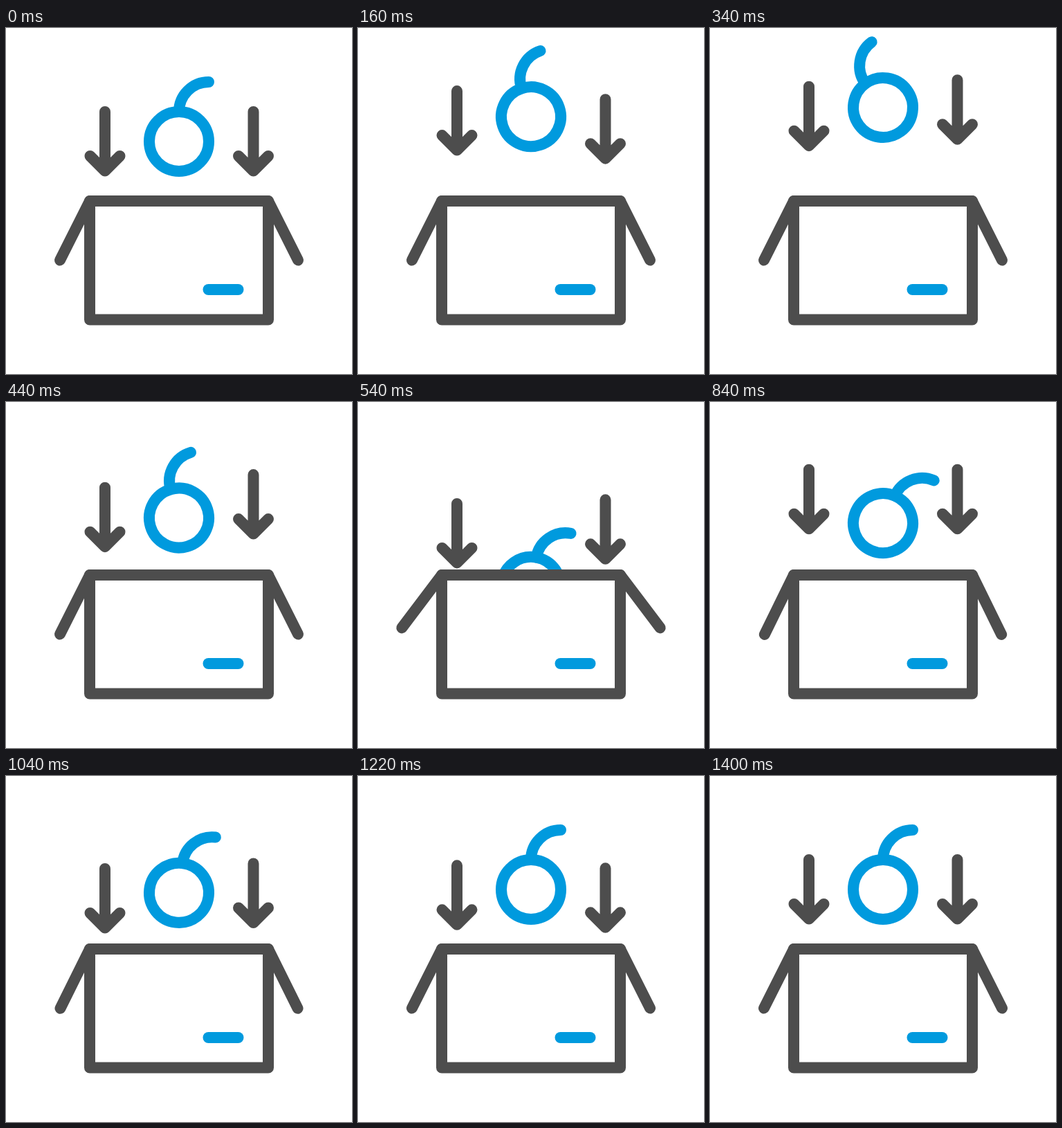
Write an HTML page that moves like this. It is 500x500 px and loops after 1520 ms.

```html
<!DOCTYPE html>
<html lang="en">
<head>
<meta charset="utf-8">
<title>Packing box</title>
<style>
  html, body { margin: 0; width: 100%; height: 100%; overflow: hidden; background: #fff; }
  svg { display: block; width: 100%; height: 100%; }
  g, path { fill: none; stroke-width: 16; stroke-linecap: round; stroke-linejoin: round; }
  .grey { stroke: #4d4d4d; }
  .blue { stroke: #009ade; }
</style>
</head>
<body>
<svg viewBox="0 0 500 500">
  <defs>
    <clipPath id="above"><path d="M0 0H500V250H0Z"/></clipPath>
    <path id="arrow" d="M0 -43V42.5M-21.5 21L0 42.5L21.5 21"/>
    <path id="flap" d="M0 0L-43 85.5"/>
  </defs>
  <g class="blue" clip-path="url(#above)">
    <g id="ball">
      <circle r="43"/>
      <path d="M0 -43A43 43 0 0 1 43 -86"/>
    </g>
  </g>
  <g class="grey">
    <use id="flapL" href="#flap"/>
    <use id="flapR" href="#flap"/>
    <path d="M121 250H379V421.5H121Z"/>
    <use id="arrowL" href="#arrow"/>
    <use id="arrowR" href="#arrow"/>
  </g>
  <path class="blue" d="M292.5 378H335.5"/>
</svg>
<script>
  const LOOP = 1520, STEP = 20;
  const SWAP = 600;   // the packed ball is gone, the next one drops in
  const BEAT = 272;   // time between two turning points of an arrow
  const LAG = 45;     // the right arrow trails the left one
  const SWINGS = [0, -47, 26, -24, 16, 0];

  const sine = p => (1 - Math.cos(Math.PI * p)) / 2;
  const fall = p => p * p;
  const land = p => 1 - Math.pow(1 - p, 2.6);

  // Eased progress from 0 to 1 between two times
  const ramp = (t, from, to, ease = sine) =>
    ease(Math.min(1, Math.max(0, (t - from) / (to - from))));

  const arrowY = t => SWINGS.slice(1).reduce((y, v, i) =>
    y + (v - SWINGS[i]) * ramp(t, i * BEAT, (i + 1) * BEAT), 0);

  const ballY = t => t < SWAP
    ? -58 * ramp(t, 0, 278) + 243 * ramp(t, 278, SWAP, fall)
    : -260 + 274 * ramp(t, SWAP, 890, land) - 14 * ramp(t, 890, 1140);

  const ballTurn = t => t < SWAP
    ? -37 * ramp(t, 0, 320) + 53 * ramp(t, 320, SWAP)
    : -13 + 37 * ramp(t, SWAP, 860) - 24 * ramp(t, 860, 1140);

  const flapTurn = t =>
    34 * ramp(t, 463, 670) - 42 * ramp(t, 670, 905) + 8 * ramp(t, 905, 1060);

  const move = (id, x, y, rest = "") =>
    document.getElementById(id).setAttribute("transform", `translate(${x} ${y}) ${rest}`);

  function draw(t) {
    const open = `rotate(${flapTurn(t)})`;
    move("flapL", 121, 250, open);
    move("flapR", 379, 250, "scale(-1 1) " + open);
    move("arrowL", 143, 164 + arrowY(t));
    move("arrowR", 357.5, 164 + arrowY(t - LAG));
    move("ball", 250, 164 + ballY(t), `rotate(${ballTurn(t)})`);
  }

  const start = performance.now();
  function tick() {
    const t = (performance.now() - start) % LOOP;
    draw(Math.floor(t / STEP) * STEP);
    requestAnimationFrame(tick);
  }
  draw(0);
  requestAnimationFrame(tick);
</script>
</body>
</html>
```
